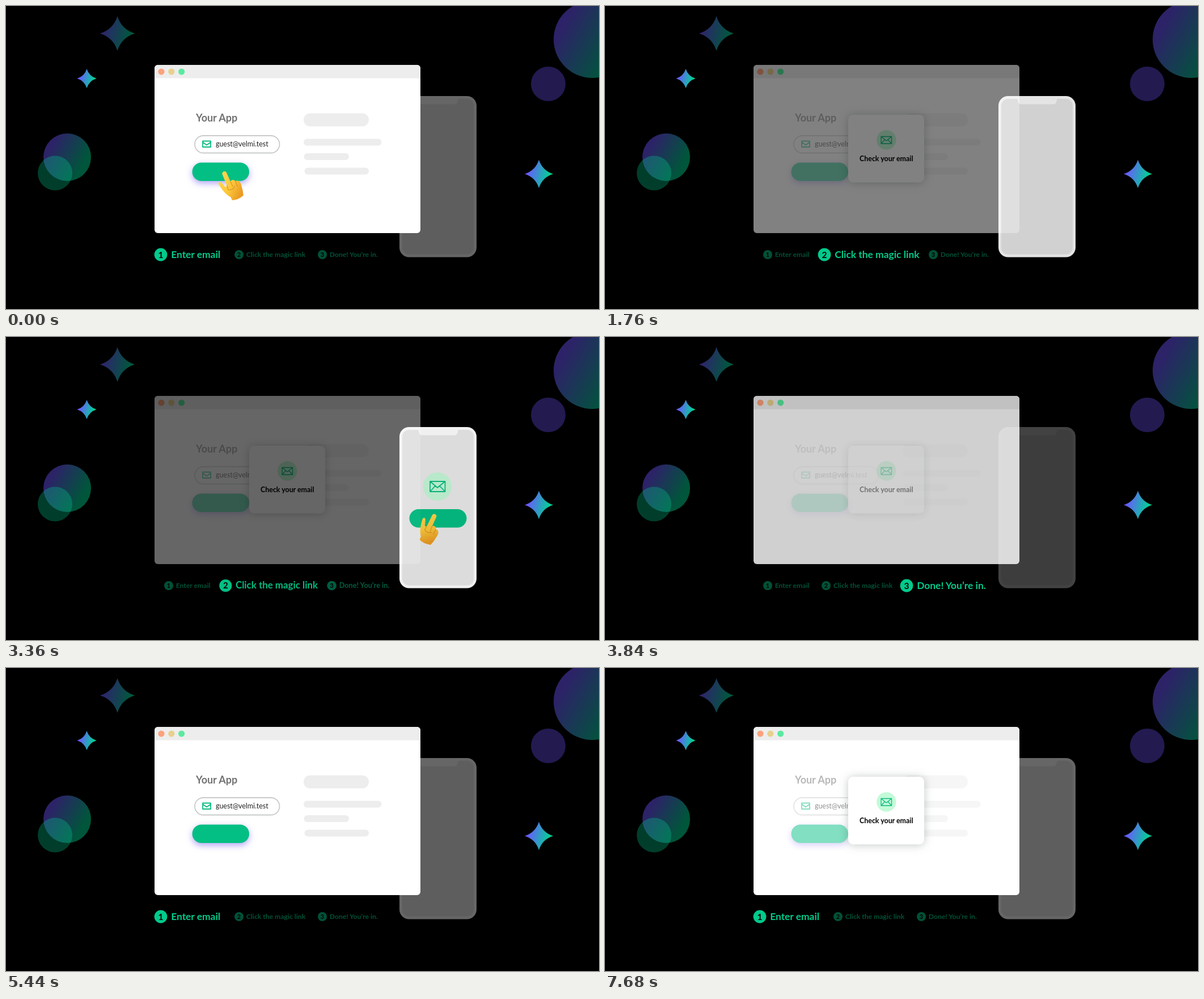
Write an HTML page that moves like this. It is 1046 by 535 pixels and loops after 8 s.

```html
<!DOCTYPE html>
<html lang="en">
<head>
<meta charset="utf-8">
<title>Email sign-in steps</title>
<style>
  html, body { margin: 0; width: 100%; height: 100%; overflow: hidden; background: #000; }
  svg { display: block; width: 100vw; height: 100vh; }
  text { font-family: Lato, "Open Sans", sans-serif; font-weight: 700; }
  .glow { filter: drop-shadow(0 4px 6px rgba(96, 72, 235, .5)); }
  .lift { filter: drop-shadow(0 1px 8px rgba(20, 45, 35, .26)); }
  .line { fill: none; stroke: #0cbb83; stroke-linejoin: round; stroke-linecap: round; }
</style>
</head>
<body>
<svg viewBox="0 0 1046 535">
  <defs>
    <linearGradient id="tint" x1="0" y1=".38" x2="1" y2=".62">
      <stop offset=".1" stop-color="#6a5aff"/>
      <stop offset=".88" stop-color="#00d292"/>
    </linearGradient>
    <linearGradient id="orb" x1=".05" y1=".25" x2=".95" y2=".75">
      <stop offset=".1" stop-color="#6a52f8"/>
      <stop offset=".85" stop-color="#00cc8c"/>
    </linearGradient>
    <linearGradient id="skin" x1="0" y1="0" x2=".6" y2="1">
      <stop offset="0" stop-color="#ffdc55"/>
      <stop offset=".6" stop-color="#fcc83c"/>
      <stop offset="1" stop-color="#eb9c24"/>
    </linearGradient>
    <path id="star" d="M0-1Q.24-.24 1 0Q.24.24 0 1Q-.24.24-1 0Q-.24-.24 0-1Z" fill="url(#tint)"/>
    <g id="hand">
      <path fill="url(#skin)" d="M-4 4C-4-1.5 4-1.5 4 4L4.5 21C8 17.500 12 20 13 23.500C17 22 20.500 26 20 32
        L18.500 44L16.500 52Q5 56-5 52.500L-5.500 46C-12 39-15 28-16.500 17C-16 12.500-11.500 13-10.500 18L-7 27L-4 25Z"/>
      <path d="M4.500 21L5 30M13 23.500L12.500 33M-4 25L-4.500 33Q4 37 8 31" fill="none"
        stroke="#dd9420" stroke-width="1.200" stroke-linecap="round"/>
    </g>
  </defs>

  <g id="backdrop">
    <use href="#star" transform="translate(196.500 48.500) scale(30.500)" opacity=".42"/>
    <use href="#star" transform="translate(142.500 128) scale(17)"/>
    <use href="#star" transform="translate(940 296.500) scale(25)"/>
    <circle cx="1034" cy="59" r="68" fill="url(#orb)" opacity=".42"/>
    <circle cx="956.500" cy="137.500" r="30.500" fill="#231a50"/>
    <circle cx="108" cy="267" r="42" fill="url(#orb)" opacity=".42"/>
    <circle cx="86.500" cy="295" r="30.500" fill="#00cc8f" opacity=".3"/>
  </g>

  <g id="scene">
    <g id="phone">
      <rect x="694" y="159" width="136" height="284.500" rx="17" fill="#fff"/>
      <rect x="699" y="164" width="126" height="274.500" rx="12" fill="#eaeaea"/>
      <path d="M726 163H799Q796.500 165 796.500 168Q796 173.500 790 173.500H735Q729 173.500 728.500 168Q728.500 165 726 163Z" fill="#fff"/>
      <g id="mail">
        <circle cx="761" cy="264" r="25" fill="#c4f8d7"/>
        <path class="line" stroke-width="1.800" d="M748 255H774.500V273H748ZL761 266L774.500 255M748 273L757 263M774.500 273L765 263"/>
        <rect x="711.500" y="304" width="101" height="32.500" rx="16.200" fill="#04bf83"/>
      </g>
      <g id="tapHand"><use href="#hand"/></g>
    </g>

    <g id="win">
      <rect x="262" y="104" width="469" height="297" rx="6" fill="#fff"/>
      <path d="M262 127.500V110a6 6 0 0 1 6-6H725a6 6 0 0 1 6 6V127.500Z" fill="#ededed"/>
      <circle cx="274" cy="116" r="5.600" fill="#fca27c"/>
      <circle cx="291.800" cy="116" r="5.600" fill="#e8d08e"/>
      <circle cx="309.600" cy="116" r="5.600" fill="#5aeaa0"/>
      <g id="form">
        <text x="335" y="204" font-size="18" fill="#727272">Your App</text>
        <rect x="333" y="229" width="149.500" height="30.500" rx="15.200" fill="#fff" stroke="#c9cbca" stroke-width="1.800"/>
        <path class="line" stroke-width="1.800" d="M347 238.500H361V249H347ZM347 240.500L354 245.500L361 240.500"/>
        <text x="370" y="248" font-size="12.400" fill="#222" style="font-weight:400">guest@velmi.test</text>
        <rect class="glow" x="328.500" y="276.500" width="100.500" height="32.500" rx="16.200" fill="#04bf83"/>
        <g fill="#ededed">
          <rect x="525" y="189.500" width="115" height="23" rx="11.500"/>
          <rect x="525" y="234.500" width="137.500" height="12" rx="6"/>
          <rect x="525.500" y="260" width="79.500" height="12" rx="6"/>
          <rect x="526.500" y="285.500" width="113.500" height="12" rx="6"/>
        </g>
      </g>
      <g id="popup">
        <rect class="lift" x="429" y="192" width="134" height="119.500" rx="8.500" fill="#fff"/>
        <circle cx="496.300" cy="236.500" r="17.200" fill="#c4fad8"/>
        <path class="line" stroke-width="1.300" d="M487 230.500H505.500V243H487ZL496.300 238L505.500 230.500M487 243L493.500 236M505.500 243L499 236"/>
        <text x="496.300" y="274" font-size="12.400" text-anchor="middle">Check your email</text>
      </g>
      <g id="pressHand"><use href="#hand"/></g>
    </g>
  </g>

  <g id="steps"></g>
</svg>
<script>
const LOOP = 8000, CYCLE = 6880, TICK = 80;
const $ = id => document.getElementById(id);
const scene = $('scene'), phone = $('phone'), win = $('win');

const labels = ['Enter email', 'Click the magic link', 'Done! You’re in.'];
// Badge centres for each active step
const layouts = [[273, 411, 558], [287, 387, 579], [287, 390, 532]];

$('steps').innerHTML = labels.map((label, i) => `<g fill="#00cb8c">
  <circle r="11.400"/>
  <text y="5.500" font-size="15.500" text-anchor="middle" fill="#000">${i + 1}</text>
  <text x="18.200" y="5.500" font-size="17.400">${label}</text></g>`).join('');
const steps = [...$('steps').children];

// cubic-bezier(.25, .1, .25, 1), solved for x by bisection
function ease(x) {
  if (x <= 0) return 0;
  if (x >= 1) return 1;
  const curve = (u, a, b) => 3 * u * (1 - u) ** 2 * a + 3 * u * u * (1 - u) * b + u ** 3;
  let lo = 0, hi = 1;
  for (let i = 0; i < 24; i++) {
    const mid = (lo + hi) / 2;
    if (curve(mid, .25, .25) < x) lo = mid; else hi = mid;
  }
  return curve(lo, .1, 1);
}

const fade = (el, value) => el.setAttribute('opacity', Math.max(0, Math.min(1, value)).toFixed(4));
const place = (el, transform) => el.setAttribute('transform', transform);

function draw(time) {
  const t = time % CYCLE;
  const go = (start, length) => ease((t - start) / length);

  const toTwo = go(1080, 400), toThree = go(3320, 400), toOne = go(4920, 400);
  const active = [1 - toTwo + toOne, toTwo - toThree, toThree - toOne];
  steps.forEach((el, i) => {
    const x = active.reduce((sum, a, k) => sum + a * layouts[k][i], 0);
    place(el, `translate(${x} 439) scale(${.7 + .3 * active[i]})`);
    fade(el, .4 + .6 * active[i]);
  });

  const swap = go(1240, 1000);
  fade(win, 1 - .6 * swap + .6 * go(3430, 1000));
  fade(phone, .4 + .6 * swap - .85 * go(3280, 960) + .25 * go(4000, 800));
  const onTop = t > 1300 && t < 3600;
  if ((scene.lastElementChild === phone) !== onTop) scene.insertBefore(phone, onTop ? null : win);

  fade($('form'), 1 - .5 * go(240, 480) - .5 * go(3600, 600) + go(4960, 480));
  fade($('popup'), go(240, 560) - go(3600, 750));

  const press = go(5760, 600), pressed = t < 3000 ? 1 : press;
  fade($('pressHand'), 1 - go(80, 400) + press);
  place($('pressHand'), `translate(${384 + 24 * (1 - pressed)} ${292.5 + 24 * (1 - pressed)}) rotate(-22)`);

  const leave = go(3400, 320), tap = go(2880, 400);
  fade($('mail'), go(2080, 600) - leave);
  fade($('tapHand'), tap - leave);
  place($('tapHand'), `translate(${757 - 12 * (1 - tap)} ${313 + 24 * (1 - tap)}) rotate(26)`);
}

function frame() {
  const t = performance.now() % LOOP;
  draw(Math.floor(t / TICK) * TICK);
  requestAnimationFrame(frame);
}
frame();
</script>
</body>
</html>
```
